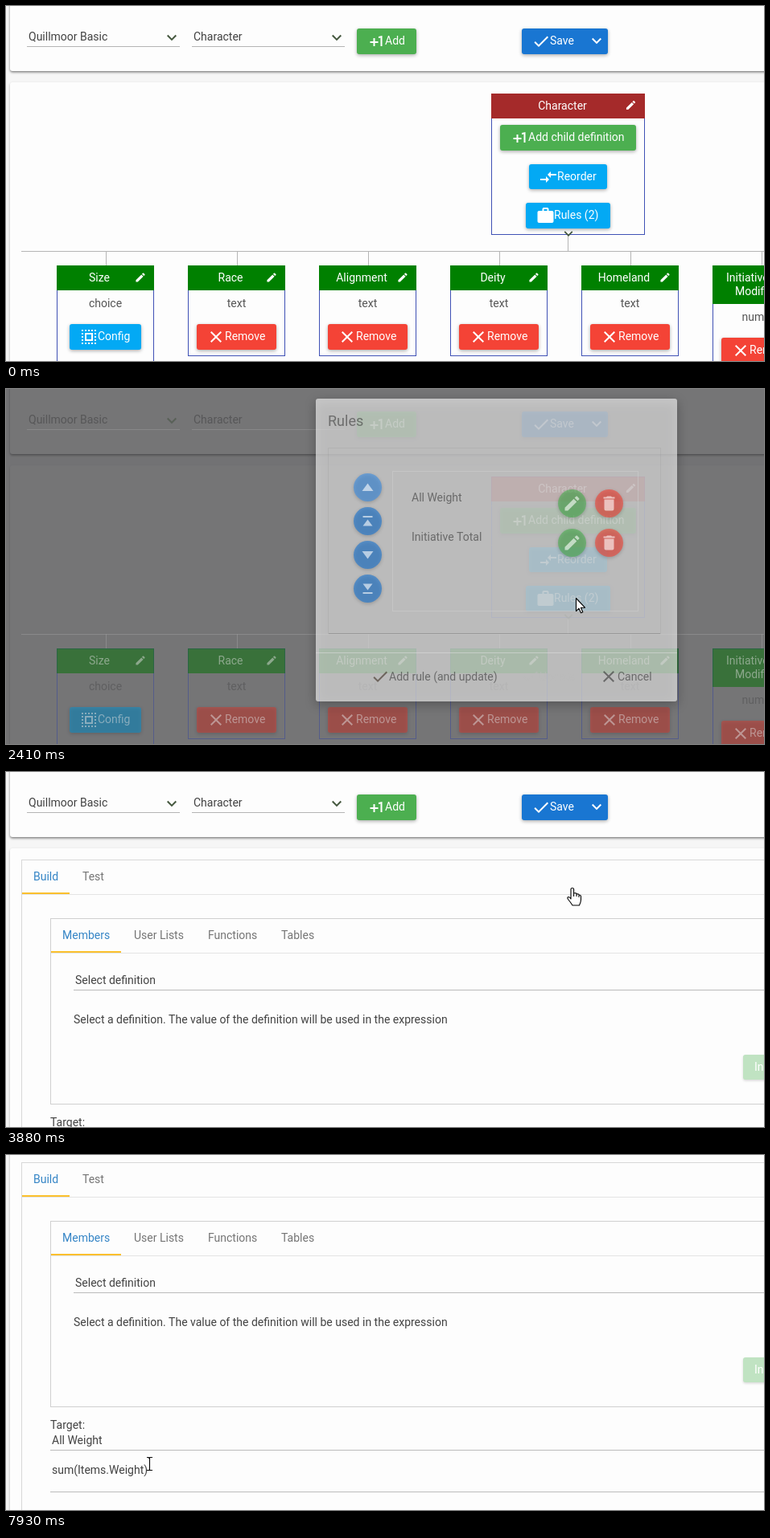
An HTML page with a canvas for the animation above (8 s loop, 942 by 442 pixels).

```html
<!DOCTYPE html>
<html lang="en">
<head>
<meta charset="utf-8">
<title>Rule editor</title>
<style>
html, body { margin: 0; width: 100%; height: 100%; overflow: hidden; background: #fff; }
canvas { display: block; }
</style>
</head>
<body>
<canvas id="stage" width="942" height="442"></canvas>
<script>
const W = 942, H = 442, LOOP = 8000;
const c = document.getElementById('stage').getContext('2d');
const GREEN = '#4caf50', BLUE = '#1976d2', SKY = '#03a9f4', RED = '#f44336', INK = '#424242';

const icons = {
  check: 'M9 16.17 4.83 12l-1.42 1.41L9 19 21 7l-1.41-1.41z',
  close: 'M19 6.41 17.59 5 12 10.59 6.41 5 5 6.41 10.59 12 5 17.59 6.41 19 12 13.41 17.59 19 19 17.59 13.41 12z',
  plusOne: 'M10 8H8v4H4v2h4v4h2v-4h4v-2h-4zM14.5 6.08v1.82l2.5-.5V18h2V5z',
  swap: 'M9.01 14H2v2h7.01v3L13 15l-3.99-4v3zm5.98-1v-3H22V8h-7.01V5L11 9l3.99 4z',
  work: 'M20 6h-4V4c0-1.11-.89-2-2-2h-4c-1.11 0-2 .89-2 2v2H4c-1.11 0-2 .89-2 2v11c0 1.11.89 2 2 2h16c1.11 0 2-.89 2-2V8c0-1.11-.89-2-2-2zm-6 0h-4V4h4v2z',
  edit: 'M3 17.25V21h3.75L17.81 9.94l-3.75-3.75zM20.71 7.04c.39-.39.39-1.02 0-1.41l-2.34-2.34c-.39-.39-1.02-.39-1.41 0l-1.83 1.83 3.75 3.75z',
  bin: 'M6 19c0 1.1.9 2 2 2h8c1.1 0 2-.9 2-2V7H6zM19 4h-3.5l-1-1h-5l-1 1H5v2h14z',
  chevron: 'M7.41 7.84 12 12.42l4.59-4.58L18 9.25l-6 6-6-6z',
  up: 'M5 16.5 12 7l7 9.5z',
  down: 'M5 7.5 12 17l7-9.5z',
  top: 'M6 5.5h12v2H6zM6 18 12 10l6 8z',
  bottom: 'M6 16.5h12v2H6zM6 6 12 14l6-8z'
};
for (const name in icons) icons[name] = new Path2D(icons[name]);

const arrow = new Path2D('M.5 .5V16.5L4 13.2 6.5 18.7 8.8 17.7 6.4 12.2H11.5Z');
const hand = new Path2D('M-2 1.8Q-2 .5-.2 .5 1.6 .5 1.6 1.8V7Q5 6.3 5 8 8 7.5 8 9 10.5 9 10.5 11V15Q10.5 18 8.5 22H0Q-2.5 18-5.5 14.5-7 12-5 11.5-3.5 11.5-2 14ZM1.6 7V11M5 8V11M8 9V12');
const beam = new Path2D('M-3 -7.5H-1L0 -6.5 1 -7.5H4M.5 -7V8M-3 8.5H4');

function text(s, x, y, color = INK, align = 'left', size = 14) {
  c.font = size + 'px Roboto, sans-serif';
  c.textAlign = align;
  c.fillStyle = color;
  c.fillText(s, x, y);
}

// Icons are placed by the centre of their 24 px box.
function icon(name, x, y, color = '#fff', scale = 1) {
  c.save();
  c.translate(x, y);
  c.scale(scale, scale);
  c.translate(-12, -12);
  c.fillStyle = color;
  c.fill(icons[name]);
  c.restore();
}

function rect(x, y, w, h, color) {
  c.fillStyle = color;
  c.fillRect(x, y, w, h);
}

function frame(x, y, w, h, color) {
  c.strokeStyle = color;
  c.lineWidth = 1;
  c.strokeRect(x + .5, y + .5, w - 1, h - 1);
}

function raised(x, y, w, h, color, radius = 3, blur = 4, shade = .32) {
  c.save();
  c.shadowColor = `rgba(0,0,0,${shade})`;
  c.shadowBlur = blur;
  c.shadowOffsetY = blur > 8 ? 4 : 1.5;
  c.fillStyle = color;
  c.beginPath();
  c.roundRect(x, y, w, h, radius);
  c.fill();
  c.restore();
}

function button(x, y, w, h, color, name, iconX, label, labelX) {
  raised(x, y, w, h, color);
  if (name) icon(name, iconX, y + 16);
  text(label, labelX, y + 20, '#fff');
}

function disc(x, y, color, name) {
  raised(x - 17.5, y - 17.5, 35, 35, color, 17.5);
  icon(name, x, y);
}

function cards(scroll) {
  rect(0, 0, W, H, '#f6f6f6');
  raised(5, -20 - scroll, W + 20, 101, '#fdfdfd', 3, 3, .5);
  raised(5, 95 - scroll, W + 20, 800, '#fdfdfd', 3, 3, .3);
}

function toolbar(scroll) {
  c.save();
  c.translate(0, -scroll);
  [['Quillmoor Basic', 26], ['Character', 231]].forEach(([label, x]) => {
    text(label, x + 2, 43);
    rect(x, 50, 190, 1, '#b4b4b4');
    icon('chevron', x + 180, 40, '#45583f');
  });
  button(436, 28, 74, 32, GREEN, 'plusOne', 460.5, 'Add', 471);
  button(641, 28, 107, 32, BLUE, 'check', 665, 'Save', 676);
  icon('chevron', 734, 44);
  c.restore();
}

function selectAll(x, y) {
  c.save();
  c.strokeStyle = '#fff';
  c.lineWidth = 2;
  c.strokeRect(x - 4, y - 4, 8, 8);
  c.setLineDash([2, 2]);
  c.lineDashOffset = 1;
  c.strokeRect(x - 8, y - 8, 16, 16);
  c.restore();
}

function node(label, i) {
  const x = 63 + 163 * i, first = i === 0, last = i === 5;
  const drop = last ? 17 : 0;
  rect(x + 61, 305, 1, 18, '#b5b5b5');
  frame(x, 323, 121, first || last ? 140 : 113, '#3f51b5');
  rect(x, 323, 121, 31 + drop, '#008000');
  if (last) {
    text('Initiative', 895, 343, '#fff');
    text('Modifier', 906, 360, '#fff');
  } else {
    text(label, x + 53, 343, '#fff', 'center');
    icon('edit', x + 104, 338, '#fff', .62);
  }
  text(first ? 'choice' : last ? 'number' : 'text', x + 60.5, 375 + drop, '#555', 'center');
  if (first) {
    button(x + 16, 396, 89, 32, SKY, null, 0, 'Config', x + 51);
    selectAll(x + 40, 412);
  } else {
    button(x + 11, 396 + drop, 99, 32, RED, 'close', x + 35, 'Remove', x + 46);
  }
}

function chart(hover) {
  frame(603, 109, 191, 176, '#3f51b5');
  rect(603, 109, 191, 31, '#a52a2a');
  text('Character', 691.5, 129, '#fff', 'center');
  icon('edit', 776.5, 123.5, '#fff', .62);
  button(614, 148, 169, 32, GREEN, 'plusOne', 638.5, 'Add child definition', 649);
  button(650, 197, 97, 31, SKY, 'swap', 674, 'Reorder', 685);
  button(646, 245, 105, 32, hover ? '#0277bd' : SKY, 'work', 670.5, 'Rules (2)', 681);
  rect(698, 285, 1, 20, '#b5b5b5');
  icon('chevron', 699, 284, '#45583f', .9);
  rect(19, 305, W, 1, '#b5b5b5');
  ['Size', 'Race', 'Alignment', 'Deity', 'Homeland', ''].forEach(node);
}

function dialog(t) {
  raised(385, 12, 449, 377, '#fff', 3, 14, .45);
  text('Rules', 400, 45.5, '#3a3a3a', 'left', 18);
  frame(400, 73, 414, 232, 'rgba(0,0,0,.08)');
  rect(401, 304, 412, 1, 'rgba(0,0,0,.25)');
  frame(480, 102, 306, 175, '#ccc');
  if (t >= 3100) rect(481, 109, 304, 49, '#e8e8e8');
  else if (t >= 2940) rect(481, 133, 304, 17, '#e8e8e8');
  ['up', 'top', 'down', 'bottom'].forEach((name, i) =>
    disc(449.5, 122.5 + 42 * i, i ? BLUE : '#3b8ee5', name));
  ['All Weight', 'Initiative Total'].forEach((label, i) => {
    const y = 142.5 + 49 * i;
    text(label, 504, y - 2.5, '#333');
    rect(502, y + 2.5, 163, 1, '#bbb');
    disc(703.5, y, !i && t >= 3400 ? '#43a047' : GREEN, 'edit');
    disc(749.5, y, RED, 'bin');
  });
  rect(385, 328, 449, 1, '#ddd');
  icon('check', 465, 358, '#3a2c20');
  text('Add rule (and update)', 476, 363, '#333');
  icon('check', 652, 358, '#bbb');
  text('Update', 663, 363, '#bbb');
  icon('close', 749, 358, '#333');
  text('Cancel', 760, 363, '#333');
}

function tabs(labels, left, y, width) {
  labels.forEach(([label, x], i) => text(label, x, y, i ? '#757575' : '#3585c6'));
  rect(left, y + 17, W, 1, '#e4e4e4');
  rect(left, y + 15, width, 2, '#fbc02d');
}

function builder(scroll) {
  c.save();
  c.translate(0, -scroll);
  frame(19, 109, W, 600, '#d8d8d8');
  tabs([['Build', 34], ['Test', 95]], 20, 135, 59);
  frame(55, 182, W, 232, '#d0d0d0');
  tabs([['Members', 70], ['User Lists', 159], ['Functions', 251], ['Tables', 342]], 56, 208, 87);
  text('Select definition', 86, 264);
  rect(84, 271, W, 1, '#bbb');
  text('Select a definition. The value of the definition will be used in the expression', 84, 313);
  raised(916, 352, 80, 31, '#c0e3c2', 3, 3, .15);
  text('Insert', 930, 372, '#fff');
  text('Target:', 55, 441);
  text('All Weight', 57, 460);
  rect(55, 467, W, 1, '#bbb');
  text('sum(Items.Weight)', 57, 497);
  rect(55, 519, W, 1, '#bbb');
  c.restore();
}

// Pointer moves: start, end, number of steps, destination.
const moves = [
  [610, 1310, 10, 736, 283], [1550, 1780, 4, 708, 260],
  [2490, 3020, 8, 683, 167], [3100, 3560, 7, 704, 144],
  [4260, 5060, 11, 406, 222], [5210, 5211, 1, 405, 222],
  [5990, 6550, 8, 163, 391], [6620, 6770, 3, 172, 380],
  [6840, 7150, 5, 125, 362], [7460, 7700, 4, 150, 391], [7770, 7930, 3, 178, 384]
];

function pointer(t) {
  if (t < 610) return;
  let x = 834, y = 442;
  for (const [start, end, steps, toX, toY] of moves) {
    if (t < start) break;
    const tick = (end - start) / Math.max(1, steps - 1);
    const p = Math.min(1, (Math.floor((t - start) / tick + .01) + 1) / steps);
    const e = p * p * (3 - 2 * p);
    x += (toX - x) * e;
    y += (toY - y) * e;
  }
  const isHand = t >= 1700 && t < 2400 || t >= 2860 && t < 4260;
  const isBeam = t > 5990 && y > 345;
  c.save();
  c.translate(Math.round(x), Math.round(y));
  c.lineWidth = 1.1;
  c.lineJoin = 'round';
  c.strokeStyle = '#000';
  c.fillStyle = '#fff';
  const shape = isBeam ? beam : isHand ? hand : arrow;
  if (!isBeam) c.fill(shape);
  c.stroke(shape);
  c.restore();
}

// Veil strength, strength of the page items, extra shade, dialog opacity.
function fade(t) {
  if (t < 2330) return [0, 1, 0, 0];
  if (t < 2410) return [.35, .75, .08, .25];
  if (t < 2490) return [.63, .5, .13, .6];
  if (t < 3730) return [.73, .45, 0, 1];
  return [.35, .7, 0, .4];
}

function draw(t) {
  c.globalAlpha = 1;
  if (t < 3800) {
    const [veil, items, shade, open] = fade(t);
    cards(0);
    rect(0, 0, W, H, `rgba(66,66,68,${veil})`);
    c.globalAlpha = items;
    toolbar(0);
    chart(t >= 1700 && t < 2410);
    c.globalAlpha = 1;
    rect(0, 0, W, H, `rgba(0,0,0,${shade})`);
    c.globalAlpha = open;
    if (open) dialog(t);
    c.globalAlpha = 1;
  } else {
    const scroll = t < 5520 ? 0 : t < 5590 ? 30 : t < 5670 ? 70 : 100;
    cards(scroll);
    toolbar(scroll);
    builder(scroll);
  }
  pointer(t);
}

const begin = performance.now();
function loop() {
  draw((performance.now() - begin) % LOOP);
  requestAnimationFrame(loop);
}
loop();
</script>
</body>
</html>
```
